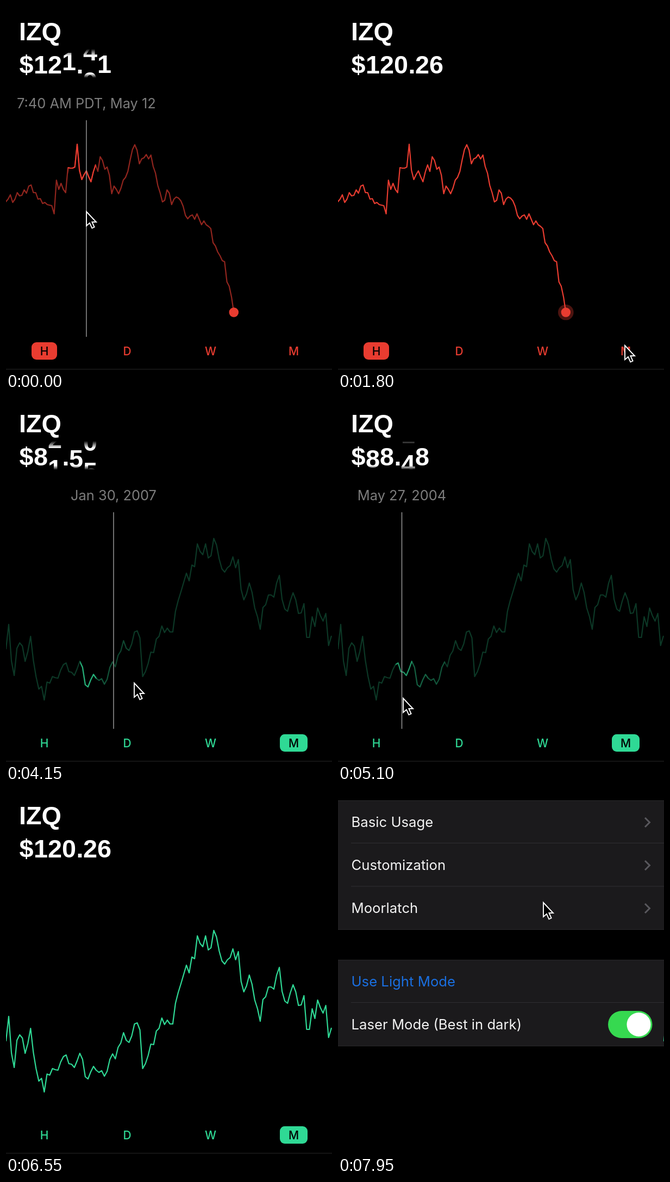
Write an HTML page that moves like this. It is 600x669 px and loops after 8000 ms.

```html
<!DOCTYPE html>
<html lang="en">
<head>
<meta charset="utf-8">
<title>Stock chart</title>
<style>
html, body { margin: 0; width: 100%; height: 100%; overflow: hidden; background: #000; }
svg { display: block; }
#stage { width: 100vw; height: 100vh; }
text { font-family: Inter, Roboto, sans-serif; }
.big text, text.big { font: bold 46.8px "Liberation Sans", Arial, sans-serif; fill: #fff; }
#label { font-size: 25.4px; fill: #7c7c7c; text-anchor: middle; }
#tabs text { font-size: 21px; font-weight: 500; text-anchor: middle; }
#settings text { font-size: 25.7px; fill: #f2f2f2; }
.plot path { fill: none; stroke-width: 2.2; stroke-linejoin: round; stroke-linecap: round; }
</style>
</head>
<body>
<svg id="stage" viewBox="0 0 600 669"></svg>
<script>
const RED = '#e83c30', GREEN = '#2fd995';
const LOOP = 8000, ROLL = 250, LAG = 83, TAP = 1850, POP = 6560;

const hourly = {
  color: RED, x0: -0.46, step: 4.24, tick: 4.24, anchor: 419.3, segStart: -18, segWidth: 50.88, segs: 9,
  ys: [360,355,347,361,355,343,349,348,338,344,331,329,343,343,355,354,363,361,365,366,367,382,320,337,326,
    337,343,297,298,298,296,254,302,319,310,303,314,323,305,292,304,277,284,300,296,311,345,331,337,345,
    335,320,315,304,283,264,255,265,290,281,279,273,281,274,295,307,330,343,360,357,338,344,365,355,351,
    353,358,368,385,391,386,384,392,382,392,402,395,402,405,409,435,441,452,459,468,470,507,515,535,563],
  caption(k) {
    const min = 780 + k * 5, h = Math.floor(min / 60);
    return `${(h + 11) % 12 + 1}:${String(min % 60).padStart(2, '0')} ${h < 12 ? 'AM' : 'PM'} PDT, May 12`;
  }
};
hourly.segStart = hourly.anchor - hourly.segWidth * hourly.segs;

const monthly = {
  color: GREEN, x0: 0, step: 5.031, tick: 2.5156, anchor: 117.5, segStart: 106.2 - 30.19 * 4, segWidth: 30.19, segs: 21,
  ys: [461,416,484,510,460,450,456,484,466,438,482,512,535,530,555,522,524,512,514,515,500,490,487,503,504,
    510,498,484,495,527,531,518,508,515,519,516,526,517,495,485,494,473,465,446,460,464,452,430,428,441,
    512,503,488,467,468,443,438,419,431,423,430,430,392,372,356,339,322,336,307,310,268,282,288,268,294,
    290,258,270,296,314,320,312,308,292,312,297,352,371,360,340,357,386,402,425,385,380,362,362,366,340,
    326,370,388,392,373,358,371,396,395,378,440,440,402,420,386,400,410,396,455,438],
  caption(k) {
    const end = new Date(2004, 5 + k, 0);
    const day = Math.min(27 + ((k * 4) % 5 + 5) % 5, end.getDate());
    return `${end.toLocaleString('en-US', { month: 'short' })} ${day}, ${end.getFullYear()}`;
  }
};

// time, x, y of the pointer tip
const pointer = [[0,148,378],[400,205,392],[850,318,410],[1000,421,418],[1300,421,418],[1700,505,600],
  [1800,528,624],[2050,528,624],[2500,518,505],[3000,518,505],[3200,420,520],[3450,330,535],[3750,138,545],
  [3950,138,545],[4150,236,524],[4500,330,530],[4950,120,552],[5600,120,552],[6050,20,-40],[6900,40,-40],
  [7250,64,240],[7400,64,240],[7650,565,442],[7720,565,442],[7950,378,207],[8000,378,207]];

const prices = [[-900,'121.41'],[-112,'122.90'],[260,'121.63'],[560,'121.82'],[888,'120.56'],[1300,'120.26'],
  [3120,'188.27'],[3500,'82.30'],[3918,'81.55'],[4290,'99.27'],[4560,'98.18'],[4913,'88.48'],[5600,'120.26']];
const slots = [[51,0],[77,-45],[103,85],[129.5,0],[142,0],[168,110]];

const clamp = v => Math.max(0, Math.min(1, v));
const smooth = v => v * v * (3 - 2 * v);
const ramp = (t, from, to, ms) => clamp((t - from) / ms) - clamp((t - to) / ms);
const touch = (t, ms) => ramp(t, -150, 1300, ms) + ramp(t, 3120, 5600, ms);
const $ = id => document.getElementById(id);

const chart = (id, c) => {
  const d = c.ys.map((y, i) => `${i ? 'L' : 'M'}${(c.x0 + i * c.step).toFixed(1)} ${y}`).join('');
  const segs = Array.from({ length: c.segs }, (_, i) => {
    const x = c.segStart + i * c.segWidth;
    return `<svg class="seg" x="${x}" y="0" width="${c.segWidth}" height="669"
      viewBox="${x} 0 ${c.segWidth} 669"><use href="#${id}Path"/></svg>`;
  }).join('');
  return `<g id="${id}" class="plot"><g class="base"><path id="${id}Path" d="${d}" stroke="${c.color}"/></g>${segs}
    ${id === 'hourly' ? `<circle id="pulse" cx="419.3" cy="563" fill="${RED}"/>
    <circle cx="419.3" cy="563" r="8.7" fill="${RED}"/>` : ''}</g>`;
};

const tabs = [['H', 70.5, 47], ['D', 223, 47], ['W', 376.5, 47], ['M', 529.5, 51]].map(([name, x, w]) =>
  `<rect x="${x - w / 2}" y="618" width="${w}" height="32" rx="9"/><text x="${x}" y="642">${name}</text>`).join('');

const card = (y, h) => `<path d="M0 ${y}h600v${h}h-600z" fill="#1b1a1c"/>
  <path d="M0 ${y}.5h600M0 ${y + h}.5h600" stroke="#29282a"/>`;
const row = (y, name, more, fill = '#f2f2f2') => `<text x="24.5" y="${y}" style="fill:${fill}">${name}</text>` +
  (more ? `<path d="M565 ${y - 17}l8.5 8.5l-8.5 8.5" fill="none" stroke="#59585d" stroke-width="3"/>` : '');

$('stage').innerHTML = `
  <defs>
    <linearGradient id="fade" x2="0" y2="1">
      <stop stop-color="#000"/><stop offset=".24" stop-color="#fff"/>
      <stop offset=".85" stop-color="#fff"/><stop offset="1" stop-color="#000"/>
    </linearGradient>
    <mask id="window" maskUnits="userSpaceOnUse" x="0" y="79" width="300" height="53">
      <rect y="79" width="300" height="53" fill="url(#fade)"/>
    </mask>
  </defs>
  <g id="settings">
    <rect width="600" height="669"/>
    ${card(19, 237)}${card(312, 158)}
    <path d="M24 97.5h576M24 177h576M24 390.5h576" stroke="#302f32"/>
    ${row(68, 'Basic Usage', true)}${row(147, 'Customization', true)}${row(226, 'Moorlatch', true)}
    ${row(361, 'Use Light Mode', false, '#1a6fe0')}${row(440, 'Laser Mode (Best in dark)')}
    <rect x="497" y="406" width="81.5" height="50" rx="25" fill="#36d950"/>
    <circle cx="553.5" cy="431" r="22" fill="#fff"/>
  </g>
  <g id="page">
    <rect width="600" height="669"/>
    <text class="big" x="24" y="63">IZQ</text>
    <text class="big" x="24.5" y="124">$</text>
    <g class="big" mask="url(#window)">${slots.map(() => '<text class="digit"/><text class="digit"/>'
      .replace(/<text class="digit"\/>/g, '<text class="digit"></text>')).join('')}</g>
    ${chart('hourly', hourly)}${chart('monthly', monthly)}
    <g id="scrub"><path d="M0 210V608" stroke="#a0a0a0" stroke-width="1.4"/><text id="label" y="188"></text></g>
    <g id="tabs">${tabs}</g>
    <path d="M0 667.5h600" stroke="#242424"/>
  </g>
  <path id="pointer" d="M0 0V26L6 20.8L10.3 30.3L14.6 28.3L10.4 19H18Z" stroke="#fff" stroke-width="1.9"/>`;

const digits = document.querySelectorAll('.digit');
const views = [['hourly', hourly], ['monthly', monthly]].map(([id, data]) => ({
  data, el: $(id), base: $(id).querySelector('.base'), segs: [...$(id).querySelectorAll('.seg')]
}));

function pointerAt(t) {
  const i = pointer.findIndex(p => p[0] > t);
  if (i === 0) return pointer[0].slice(1);
  const [ta, xa, ya] = pointer[i - 1], [tb, xb, yb] = pointer[i];
  const u = smooth((t - ta) / (tb - ta));
  return [xa + (xb - xa) * u, ya + (yb - ya) * u];
}

function tickAt(t, c) {
  const x = pointerAt(t - LAG)[0] - 1.5;
  return Math.round(((c === hourly ? Math.min(x, c.anchor) : x) - c.anchor) / c.tick);
}
const lineAt = (t, c) => c.anchor + tickAt(t, c) * c.tick;

function drawPrice(t) {
  let i = prices.length - 1;
  while (i > 1 && prices[i][0] > t) i--;
  const start = prices[i][0];
  const [from, to] = [prices[i - 1][1], prices[i][1]];
  const shift = (6 - from.length) + (from.length - to.length) * smooth(clamp((t - start) / ROLL));
  const a = from.padStart(6), b = to.padStart(6);
  slots.forEach(([x, delay], s) => {
    const p = a[s] === b[s] ? 1 : clamp((t - start - delay) / ROLL);
    [[a[s], -54 * p], [b[s], 54 * (1 - p)]].forEach(([char, dy], n) => {
      const el = digits[s * 2 + n];
      el.textContent = n === 0 && p === 1 ? '' : char;
      el.setAttribute('x', x - 26 * shift);
      el.setAttribute('y', 124 + dy);
    });
  });
}

function drawCharts(t) {
  const mix = clamp((t - TAP) / 300), held = touch(t, 300);
  views.forEach(({ data, el, base, segs }, n) => {
    el.setAttribute('opacity', n ? mix : 1 - mix);
    base.setAttribute('opacity', 1 - 0.74 * held);
    const lit = segs.map(() => 0), samples = 12;
    for (let s = 0; s < samples; s++) {
      const k = Math.floor((lineAt(t - s * 22, data) - 0.5 - data.segStart) / data.segWidth);
      if (k in lit) lit[k] += 1 / samples;
    }
    segs.forEach((seg, k) => seg.setAttribute('opacity', held > 0 ? lit[k] : 0));
  });
  const u = t % 2000 / 2000;
  $('pulse').setAttribute('r', 8.5 + 6.5 * u);
  $('pulse').setAttribute('opacity', 1 - 0.75 * u);
}

function drawScrub(t) {
  const c = t < TAP ? hourly : monthly, x = lineAt(t, c);
  $('scrub').setAttribute('opacity', touch(t, 120));
  $('scrub').setAttribute('transform', `translate(${x} 0)`);
  $('label').textContent = c.caption(tickAt(t, c));
  const half = $('label').getComputedTextLength() / 2;
  $('label').setAttribute('x', Math.max(half + 18, Math.min(582 - half, x)) - x);
}

function drawTabs(t) {
  const active = t < TAP ? 0 : 3, color = t < TAP ? RED : GREEN;
  document.querySelectorAll('#tabs rect').forEach((r, i) => r.setAttribute('fill', i === active ? color : 'none'));
  document.querySelectorAll('#tabs text').forEach((l, i) => l.setAttribute('fill', i === active ? '#000' : color));
}

function draw(t) {
  drawPrice(t);
  drawCharts(t);
  drawScrub(t);
  drawTabs(t);
  const w = 20 * Math.max(0, t - POP) / 1000, rest = t > 7250 ? 0 : (1 + w) * Math.exp(-w);
  $('page').setAttribute('transform', `translate(${600 * (1 - rest)} 0)`);
  $('settings').setAttribute('transform', `translate(${-180 * rest} 0)`);
  $('pointer').setAttribute('transform', `translate(${pointerAt(t).join(' ')})`);
}

const begin = performance.now();
function frame() {
  draw((performance.now() - begin) % LOOP);
  requestAnimationFrame(frame);
}
frame();
</script>
</body>
</html>
```
